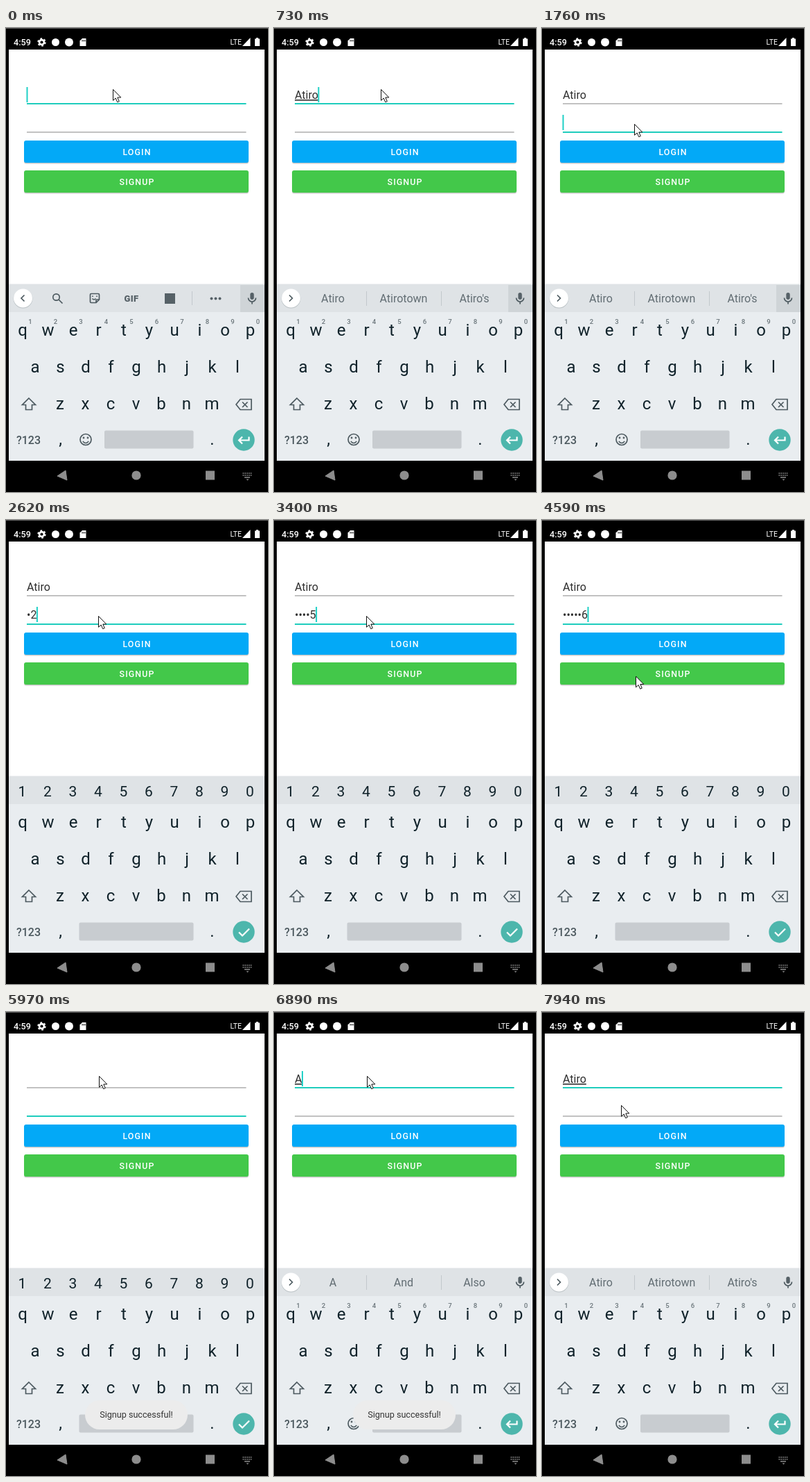
An HTML page for the animation above (8 s loop, 378 px wide and 668 px high).

```html
<!DOCTYPE html>
<html lang="en">
<head>
<meta charset="utf-8">
<title>Sign-up screen</title>
<style>
  html, body { margin: 0; width: 100%; height: 100%; overflow: hidden; background: #000; }
  svg { display: block; width: 378px; height: 668px; font-family: Roboto, sans-serif; }
  .mid { text-anchor: middle; }
  .field { font-size: 16px; fill: #2f2f2f; }
  .btn { font-size: 12.4px; font-weight: 500; letter-spacing: 1.1px; fill: #fff; }
  .key { font-size: 24px; fill: #10222a; }
  .digit { font-size: 21px; fill: #10222a; }
  .hint { font-size: 9.5px; font-weight: 500; fill: #6a757a; }
  .word { font-size: 16px; fill: #626d73; }
  .line { fill: none; stroke: #4d5a60; stroke-width: 1.7; }
  .solid { fill: #566167; }
  .white { fill: none; stroke: #fff; stroke-width: 2.2; }
  .caret { fill: #1fd0c6; }
  .split { fill: none; stroke: #c2c8cc; }
</style>
</head>
<body>
<svg viewBox="0 0 378 668">
  <path d="M0 .5H378" stroke="#5a5a5a"/>
  <path d="M4 31H373V623H4Z" fill="#fff"/>

  <g fill="#fff">
    <text x="11" y="25" font-size="12.6" font-weight="500">4:59</text>
    <circle cx="51.5" cy="20.5" r="3.4" fill="none" stroke="#fff" stroke-width="2.6"/>
    <circle cx="51.5" cy="20.5" r="5.2" fill="none" stroke="#fff" stroke-width="2" stroke-dasharray="2.7 2.745"/>
    <circle cx="71.5" cy="20.5" r="5.5"/>
    <circle cx="91" cy="20.5" r="6"/>
    <path d="M110 15H115.500V26H106.500V18.500Z"/>
    <path d="M110 17v2.500M112 17v2.500M114 17v2.500" stroke="#000" stroke-width=".9"/>
    <text x="323.500" y="24" font-size="10.5">LTE</text>
    <path d="M352.500 14V26H341Z"/>
    <path d="M359 15.500H361V14H364V15.500H366V26H359Z"/>
  </g>

  <text id="name" class="field" x="30" y="102"></text>
  <text id="pass" class="field" x="30" y="142"></text>
  <path id="nameLine" d="M30 109H346.500"/>
  <path id="passLine" d="M30 150H346.500"/>
  <rect id="caret" class="caret" width="2" height="22"/>

  <rect x="26" y="163" width="324" height="32.500" rx="3" fill="#000" opacity=".2"/>
  <rect x="26" y="162" width="324" height="32" rx="3" fill="#03a9f7"/>
  <text class="btn mid" x="189" y="183">LOGIN</text>
  <rect id="lift" x="24.500" y="205" width="328" height="37" rx="5" fill="#000" opacity=".13"/>
  <rect x="26" y="206" width="324" height="32.500" rx="3" fill="#000" opacity=".2"/>
  <rect x="26" y="205" width="324" height="32" rx="3" fill="#43c84a"/>
  <rect id="ripple" x="26" y="205" width="324" height="32" rx="3" fill="#fff"/>
  <text class="btn mid" x="189" y="226">SIGNUP</text>

  <path d="M4 369H373V623H4Z" fill="#e9edf0"/>
  <path d="M4 369H373V409H4Z" fill="#dfe3e6"/>
  <path d="M4 368.500H373" stroke="#f0f2f3"/>
  <g id="letters"></g>
  <g id="digits"></g>

  <g id="bar">
    <path id="micBack" d="M338 370H373V409H338Z" fill="#cfd4d7"/>
    <circle cx="24.500" cy="389.800" r="13.800" fill="#b9c0c4"/>
    <circle cx="24.500" cy="389" r="13.500" fill="#fff"/>
    <path id="chevron" class="line"/>
    <rect class="solid" x="352.300" y="381" width="5.400" height="10" rx="2.700"/>
    <path class="line" d="M349.500 388.500a5.500 5.500 0 0 0 11 0M355 394V397.500"/>
    <g id="icons">
      <circle class="line" cx="72.500" cy="387.500" r="4.700" stroke-width="2"/>
      <path class="line" d="M76 391L81.500 396.500"/>
      <path class="line" d="M123 382.500H133Q134.500 382.500 134.500 384V391L130 395.500H123Q121.500 395.500 121.500 394V384Q121.500 382.500 123 382.500ZM134 391H131Q130 391 130 392V395M124.500 389.500Q127 392.500 129.500 389.500"/>
      <path class="line" d="M125 385.500V387M131 385.500V387"/>
      <text class="mid solid" x="181" y="393.500" font-size="13" font-weight="900" letter-spacing=".4">GIF</text>
      <rect class="solid" x="229" y="382" width="15" height="15"/>
      <path class="split" d="M268.500 379V399"/>
      <g class="solid"><circle cx="296.500" cy="389.500" r="2"/><circle cx="302.500" cy="389.500" r="2"/><circle cx="308.500" cy="389.500" r="2"/></g>
    </g>
    <g id="words">
      <path class="split" d="M133.500 379V400M241.500 379V400"/>
      <text class="word mid" x="85" y="395"></text>
      <text class="word mid" x="187" y="395"></text>
      <text class="word mid" x="289" y="395"></text>
    </g>
  </g>

  <path class="line" d="M33 533L42.500 542.500H37.500V549.500H28.500V542.500H23.500Z"/>
  <path class="line" d="M338 534.500H354V549.500H338L332 542ZM341 538.500L348.500 546M348.500 538.500L341 546"/>
  <text class="mid" x="32.500" y="598.500" font-size="16" font-weight="500" fill="#4b585e">?123</text>
  <text class="key mid" x="78.500" y="600">,</text>
  <text class="key mid" x="297.500" y="600">.</text>
  <rect id="space" y="579.500" height="26" rx="2" fill="#c8ccd0"/>
  <g id="smile">
    <circle class="line" cx="115" cy="592.500" r="8"/>
    <path class="line" d="M110.800 595Q115 600 119.200 595"/>
    <circle class="solid" cx="112" cy="590" r="1.400"/><circle class="solid" cx="118" cy="590" r="1.400"/>
  </g>
  <circle cx="343" cy="593" r="15.700" fill="#4db6ac"/>
  <path id="enter" class="white"/>

  <g id="toast">
    <rect x="114" y="559" width="148" height="42" rx="21" fill="#ececec"/>
    <text class="mid" x="188" y="584" font-size="12.6" fill="#333">Signup successful!</text>
  </g>

  <g fill="#8d8d8d">
    <path d="M74 645L86 637L88 651Z" stroke="#8d8d8d" stroke-linejoin="round"/>
    <circle cx="188" cy="644" r="6.600"/>
    <rect x="288" y="637.500" width="13" height="13"/>
    <path d="M341.500 641H354.500M341.500 644H354.500" fill="none" stroke="#8d8d8d" stroke-width="1.500" stroke-dasharray="1.700 1.100"/>
    <path d="M344 646.300H352V647.800H344ZM346.500 649.500H350.500L348.500 651.500Z"/>
  </g>

  <path id="mouse" d="M0 .5V16.300L3.700 13L6.200 18.700L8.800 17.600L6.300 12H11.300Z" fill="#fff" stroke="#111"/>
</svg>

<script>
const LOOP = 8000;
const NAME = "Atiro";
const WORDS = [
  ["", "", ""],
  ["A", "And", "Also"],
  ["At", "Attic", "After"],
  ["Ati", "Attic", "Attire"],
  ["Atir", "Attire", "Attiring"],
  [NAME, NAME + "town", NAME + "'s"]
];

// Each step changes part of the state; typed = letters in the name field.
const STEPS = [
  [0, { typed: 0, pass: "", focus: "name", caret: 1, keys: "text", bar: "icons", mic: 1, toast: 0, press: 0, mouse: [154.5, 88] }],
  [430, { typed: 3, bar: "words" }],
  [580, { typed: 4 }],
  [730, { typed: 5 }],
  [1130, { mouse: [153, 94] }],
  [1250, { mouse: [148, 106], caret: 0 }],
  [1370, { mouse: [141, 118] }],
  [1490, { mouse: [136, 128] }],
  [1640, { mouse: [133.5, 138], focus: "pass", caret: 1 }],
  [1880, { keys: "pass" }],
  [2310, { caret: 0 }],
  [2620, { pass: "•2", caret: 1 }],
  [2900, { pass: "••3" }],
  [3150, { pass: "•••4" }],
  [3400, { pass: "••••5" }],
  [3680, { pass: "•••••6", mouse: [130, 167] }],
  [3830, { mouse: [134, 206] }],
  [3950, { mouse: [135.5, 224.5] }],
  [4100, { caret: 0 }],
  [4350, { press: 1 }],
  [4470, { press: 0.5 }],
  [4590, { press: 0, caret: 1 }],
  [5020, { pass: "••••••", caret: 0 }],
  [5430, { typed: 0, pass: "", caret: 1, toast: 0.4 }],
  [5550, { toast: 0.8 }],
  [5700, { toast: 1, mouse: [135.5, 227] }],
  [5850, { mouse: [136, 140] }],
  [5970, { mouse: [134.5, 92], caret: 0 }],
  [6220, { focus: "name", caret: 1, keys: "text", bar: "words", mic: 0 }],
  [6370, { bar: "icons" }],
  [6770, { typed: 1 }],
  [6890, { bar: "words" }],
  [7010, { typed: 2 }],
  [7130, { typed: 3 }],
  [7370, { typed: 4 }],
  [7670, { typed: 5, toast: 0.5 }],
  [7790, { toast: 0 }],
  [7940, { caret: 0, mouse: [114.5, 134] }]
];

const el = {};
document.querySelectorAll("[id]").forEach(node => { el[node.id] = node; });

const set = (node, attrs) => {
  for (const key in attrs) node.setAttribute(key, attrs[key]);
};
const show = (node, on) => { node.style.display = on ? "" : "none"; };

function row(parent, chars, x, y, cls) {
  [...chars].forEach((char, i) => {
    const node = document.createElementNS("http://www.w3.org/2000/svg", "text");
    set(node, { x: x + i * 36.5, y, class: cls + " mid" });
    node.textContent = char;
    parent.append(node);
  });
}

row(el.letters, "qwertyuiop", 24, 443, "key");
row(el.letters, "asdfghjkl", 42, 496, "key");
row(el.letters, "zxcvbnm", 78, 548.5, "key");
row(el.digits, "1234567890", 23.5, 397.5, "digit");
const hints = el.letters.appendChild(el.letters.cloneNode(false));
hints.removeAttribute("id");
row(hints, "1234567890", 35, 425.5, "hint");

function render(s) {
  const onName = s.focus === "name";
  const textKeys = s.keys === "text";
  const icons = s.bar === "icons";

  el.name.textContent = NAME.slice(0, s.typed);
  el.name.style.textDecoration = onName ? "underline" : "none";
  el.pass.textContent = s.pass;
  for (const id of ["name", "pass"]) {
    const on = s.focus === id;
    set(el[id + "Line"], { stroke: on ? "#1fcdbd" : "#858585", "stroke-width": on ? 1.8 : 1 });
  }
  const field = el[s.focus];
  const end = field.textContent ? field.getComputedTextLength() : 0;
  set(el.caret, { x: 29.5 + end, y: onName ? 85 : 125 });
  show(el.caret, s.caret);

  show(el.lift, s.press);
  set(el.ripple, { opacity: s.press * 0.25 });

  show(el.bar, textKeys);
  show(el.digits, !textKeys);
  show(hints, textKeys);
  show(el.smile, textKeys);
  show(el.icons, icons);
  show(el.words, !icons);
  show(el.micBack, s.mic);
  set(el.chevron, { d: icons ? "M26.5 384.5L22 389L26.5 393.5" : "M22 384.5L26.500 389L22 393.5" });
  el.words.querySelectorAll("text").forEach((node, i) => { node.textContent = WORDS[s.typed][i]; });
  set(el.space, textKeys ? { x: 142, width: 128.5 } : { x: 105.5, width: 165 });
  set(el.enter, { d: textKeys ? "M350.5 588.5V593.5H336.500M341 588.500L336 593.500L341 598.500" : "M336 593.500L341 598.500L351 588.500" });

  set(el.toast, { opacity: s.toast });
  set(el.mouse, { transform: `translate(${s.mouse})` });
}

let shown = -1;
function tick() {
  const t = performance.now() % LOOP;
  const count = STEPS.filter(step => step[0] <= t).length;
  if (count !== shown) {
    shown = count;
    render(Object.assign({}, ...STEPS.slice(0, count).map(step => step[1])));
  }
  requestAnimationFrame(tick);
}
tick();
</script>
</body>
</html>
```
